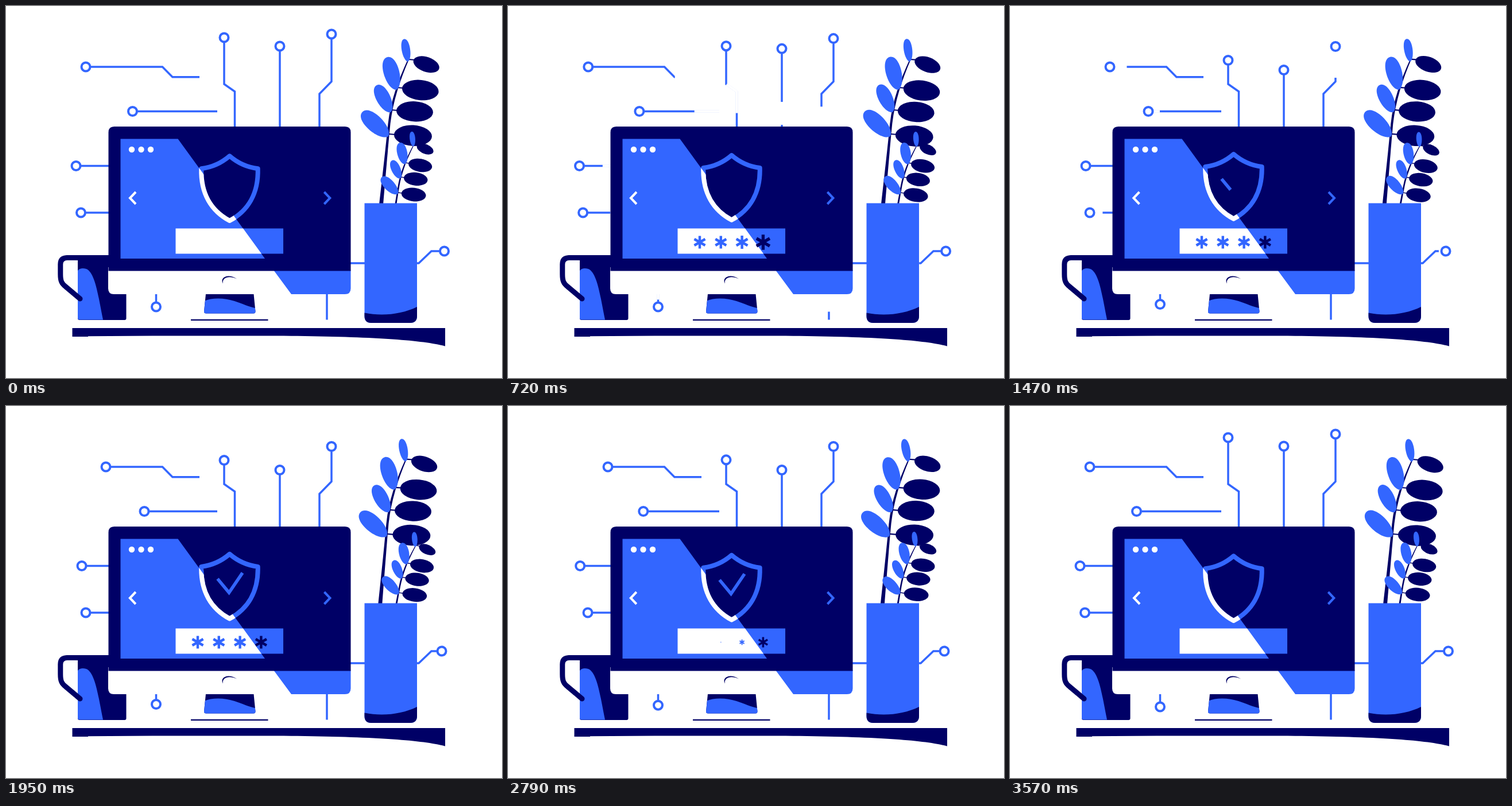
Recreate the animation shown at these times as an HTML page. Size 864 by 648 pixels, loop 3.6 s.

```html
<!DOCTYPE html>
<html lang="en">
<head>
<meta charset="utf-8">
<title>Secure login</title>
<style>
  html, body { margin: 0; width: 100%; height: 100%; overflow: hidden; background: #fff; }
  svg { display: block; width: 100vw; height: 100vh; }
  .dark { fill: #006; }
  .blue { fill: #36f; }
  .white { fill: #fff; }
  .line { fill: none; stroke: #36f; stroke-width: 3.5; }
  .gap { fill: none; stroke: #fff; stroke-width: 4.4; }
  .node { fill: #fff; stroke: #36f; stroke-width: 4; }
  .twig { fill: none; stroke: #006; stroke-width: 2.2; }
  .rim { stroke-width: 8; stroke-linejoin: round; }
  .arrow { fill: none; stroke-width: 4; }
</style>
</head>
<body>
<svg viewBox="0 0 864 648">
  <defs>
    <clipPath id="lit"><path d="M199.5 231.5H299.5L451 440H199.5Z"/></clipPath>
    <clipPath id="foot"><path d="M348 502H431.5L434.5 532Q434.5 535.5 431 535.5H348.5Q344.7 535.5 345 532Z"/></clipPath>
    <path id="badge" d="M389.5 261.3C403 273 420 281 438.7 283.3C440 327 421 357 389.5 374C358 357 339 327 340.3 283.3C359 281 376 273 389.5 261.3Z"/>
    <path id="star" d="M0-11V11M-9.5-5.5L9.5 5.5M-9.5 5.5L9.5-5.5" fill="none" stroke-width="4.4"/>
  </defs>
  <rect class="white" width="864" height="648"/>

  <g id="links"><path class="line" d="M596 448H630"/></g>

  <!-- mug -->
  <path class="dark" d="M125 438H209.5V544Q209.5 547 206.5 547H128Q125 547 125 544Z"/>
  <path class="blue" d="M125 461C128 456.5 134 456 140 458C156 465 161 508 169 546.5H128Q125 546.5 125 543.5Z"/>
  <path d="M184 438.5H106Q94.8 439 94.8 450V467C94.8 479 97 483.5 103.5 488.5L129 510" fill="none" stroke="#006" stroke-width="9" stroke-linecap="round"/>

  <!-- monitor -->
  <path class="white" d="M178 455H500V502H188Q178 502 178 492Z"/>
  <path class="blue" d="M466 460H600.5V492Q600.5 502 590.5 502H497Z"/>
  <path class="dark" d="M178.5 461.5V220Q178.5 210 188.5 210H590.5Q600.5 210 600.5 220V461.5Z"/>
  <path class="blue" d="M199.5 231.5H299.5L451 440H199.5Z"/>
  <g class="white"><circle cx="219" cy="250" r="5.2"/><circle cx="235.5" cy="250" r="5.2"/><circle cx="252" cy="250" r="5.2"/></g>
  <path class="blue" d="M295.5 387.5H483V431.5H295.5Z"/>
  <path class="white" d="M295.5 387.5H413L445 431.5H295.5Z"/>
  <g id="stars"></g>
  <g class="lift"><use href="#badge" class="rim" fill="#006" stroke="#36f"/></g>
  <g clip-path="url(#lit)"><g class="lift"><use href="#badge" class="rim" fill="none" stroke="#fff"/></g></g>
  <g class="lift"><path id="check" d="M368.5 304.5L388.5 328.5L412 294" fill="none" stroke="#36f" stroke-width="5.6" pathLength="1"/></g>
  <path id="prev" class="arrow" stroke="#fff" d="M226 324L216 334.5L226 345"/>
  <path id="next" class="arrow" stroke="#36f" d="M554.3 324L564.3 334.5L554.3 345"/>
  <path class="dark" d="M378 483.5C371.5 472 389 465.5 402 475.5C389 468.5 375.5 473 378 483.5Z"/>
  <g clip-path="url(#foot)">
    <path class="dark" d="M340 500H440V540H340Z"/>
    <path class="blue" d="M340 517C354 507 380 508 398 514S424 525 440 527V540H340Z"/>
  </g>
  <path class="dark" d="M322 545.7H456.5V548H322Z"/>

  <g id="plants"></g>

  <!-- vase and desk -->
  <path class="blue" d="M624.5 343.5H716V540Q716 552 704 552H636Q624.5 552 624.5 540Z"/>
  <path class="dark" d="M624.5 534.5C655 541 690 537 716 524V540Q716 552 704 552H636Q624.5 552 624.5 540Z"/>
  <path class="dark" d="M115.5 561H765V592.5C725 582 640 576 484 574.5H255L143 575.3V576H115.5Z"/>
</svg>
<script>
const LOOP = 3600;
const $ = id => document.getElementById(id);
const clamp = u => Math.min(1, Math.max(0, u));
const ease = (t, start, dur) => { const u = clamp((t - start) / dur); return u * u * (3 - 2 * u); };
const wave = (t, peak, period = LOOP) => Math.cos(2 * Math.PI * (t - peak) / period);
const place = (el, transform) => el.setAttribute('transform', transform);

function add(parent, tag, attrs) {
  const el = document.createElementNS('http://www.w3.org/2000/svg', tag);
  for (const k in attrs) el.setAttribute(k, attrs[k]);
  return parent.appendChild(el);
}

// Shows the part of a path between two distances.
function trim(el, from, to) {
  el.style.display = to > from ? '' : 'none';
  if (to > from) el.setAttribute('stroke-dasharray', `0 ${from} ${to - from} 9999`);
}

// A circuit line from the screen to a node: a white gap runs along it (front, tail)
// while the node slides by dx, dy (out) and springs home (back).
const links = [];
function link(path, end, [dx, dy], times) {
  const g = $('links');
  const line = add(g, 'path', { class: 'line' });
  const gap = add(g, 'path', { class: 'gap' });
  const node = dx || dy ? add(g, 'circle', { class: 'node', r: 7.5 }) : null;
  links.push({ path, end, dx, dy, line, gap, node, ...times });
}
link('M337 123.7H290L272.5 106', [139, 106], [35, 0], { front: 450, tail: 807, out: 650, back: 2870 });
link('M368 183.5', [220.5, 183.5], [20.5, 0], { front: 390, tail: 780, out: 370, back: 2660 });
link('M398.5 212V149L380 136', [380, 55], [0, 39.5], { front: 240, tail: 490, out: 390, back: 2760 });
link('M477 212', [477, 70], [0, 41.5], { front: 380, tail: 620, out: 560, back: 2940 });
link('M546 212V153L567 131.5', [567, 49], [0, 21.5], { front: 450, tail: 940, out: 400, back: 2860 });
link('M180 278.5', [122, 278.5], [10, 0], { front: 540, tail: 940, out: 460, back: 2580 });
link('M180 360', [130.5, 360], [8.5, 0], { front: 660, tail: 1210, out: 660, back: 2900 });
link('M714 448H719L741 427', [763.5, 427], [-4.5, 0], { front: 660, tail: 1080, out: 500, back: 2690 });
link('M261.5 502', [261.5, 524], [0, -4.5], { front: 420, tail: 960, out: 700, back: 2660 });
link('M559 502', [559, 546.5], [0, 0], { front: 420, tail: 960 });

function drawLink(l, t) {
  let [x, y] = l.end;
  if (l.node) {
    const peak = l.back + 430;
    const home = ease(t, l.back, 430);
    const settle = ease(t, peak, Math.min(300, LOOP - 30 - peak));
    const over = 3 / Math.hypot(l.dx, l.dy);
    const k = ease(t, l.out, 800) - home - over * (home - settle);
    x += l.dx * k;
    y += l.dy * k;
    l.node.setAttribute('cx', x);
    l.node.setAttribute('cy', y);
  }
  const d = `${l.path}L${x} ${y}`;
  l.line.setAttribute('d', d);
  l.gap.setAttribute('d', d);
  const len = l.line.getTotalLength() - (l.node ? 8 : 0);
  const dur = len < 70 ? 480 : 860;
  trim(l.gap, ease(t, l.tail, dur) * len, ease(t, l.front, dur) * len);
}

// A sprig carries a dark leaf to the right and a blue one to the left at each knot.
const knots = [[667, 223, 33, 31], [671, 181, 32, 26.5], [681, 142, 32, 29.5], [701, 93, 23.5, 20]];
const leaves = [];
function sprig(transform) {
  const sway = add($('plants'), 'g', {});
  const g = add(sway, 'g', { transform });
  add(g, 'path', { class: 'dark', d: 'M650 346C657 285 662 240 665.5 205C670 165 683 130 700 93H702C686 130 674.5 165 669.5 205C666 240 661 300 657 346Z' });
  knots.forEach(([x, y, a, b], i) => {
    add(g, 'path', { class: 'twig', d: `M${x} ${y}l12 1` });
    const right = add(g, 'ellipse', { class: 'dark', cx: a, rx: a, ry: a * 0.55 });
    leaves.push({ el: right, x: x + 9, y: y + 1, deg: 3 + 0.2 * i ** 4, slip: 1 });
  });
  knots.forEach(([x, y, a, b], i) => {
    const w = b * (i < 3 ? 0.46 : 0.37), l = 2 * b;
    const left = add(g, 'path', {
      class: 'blue',
      d: `M0 0C${1.25 * w} ${-0.08 * l} ${1.42 * w} ${-l} 0 ${-l}C${-1.42 * w} ${-l} ${-1.25 * w} ${-0.08 * l} 0 0Z`
    });
    leaves.push({ el: left, x: x - 1, y: y + 4, deg: -47 * 0.58 ** i, slip: 0 });
  });
  return sway;
}
const tall = sprig('');
const small = sprig('translate(683 325) rotate(3.5) scale(.65) translate(-667 -223)');

const stars = [0, 1, 2, 3].map(i => add($('stars'), 'use', { href: '#star', stroke: i < 3 ? '#36f' : '#006' }));
const lifts = document.querySelectorAll('.lift');

function drawStar(el, i, t) {
  const start = 135 + i * 120;
  const k = 1.25 * ease(t, start, 170) - 0.25 * ease(t, start + 170, 230) - ease(t, 2550 + i * 60, 220);
  place(el, `translate(${334 + i * 36.8} 411.5) scale(${Math.max(0, k)})`);
}

function draw(t) {
  links.forEach(l => drawLink(l, t));
  stars.forEach((el, i) => drawStar(el, i, t));

  const lift = 1.75 * (wave(t, 0) - 1);
  lifts.forEach(g => place(g, `translate(0 ${lift})`));
  trim($('check'), ease(t, 2880, 400), ease(t, 1300, 440));

  const nudge = 1.15 * (1 - wave(t, 0, LOOP / 2));
  place($('prev'), `translate(${-nudge} 0)`);
  place($('next'), `translate(${nudge} 0)`);

  place(tall, `rotate(${0.28 * (wave(t, 300) - wave(0, 300))} 655 545)`);
  place(small, `rotate(${0.84 * (wave(t, 1550) - wave(0, 1550))} 678 390)`);
  const droop = wave(t, LOOP / 4);
  leaves.forEach(l => place(l.el, `translate(${l.x - l.slip * droop} ${l.y}) rotate(${l.deg + 1.4 * droop})`));
}

const begin = performance.now();
function tick() {
  draw((performance.now() - begin) % LOOP);
  requestAnimationFrame(tick);
}
tick();
</script>
</body>
</html>
```
